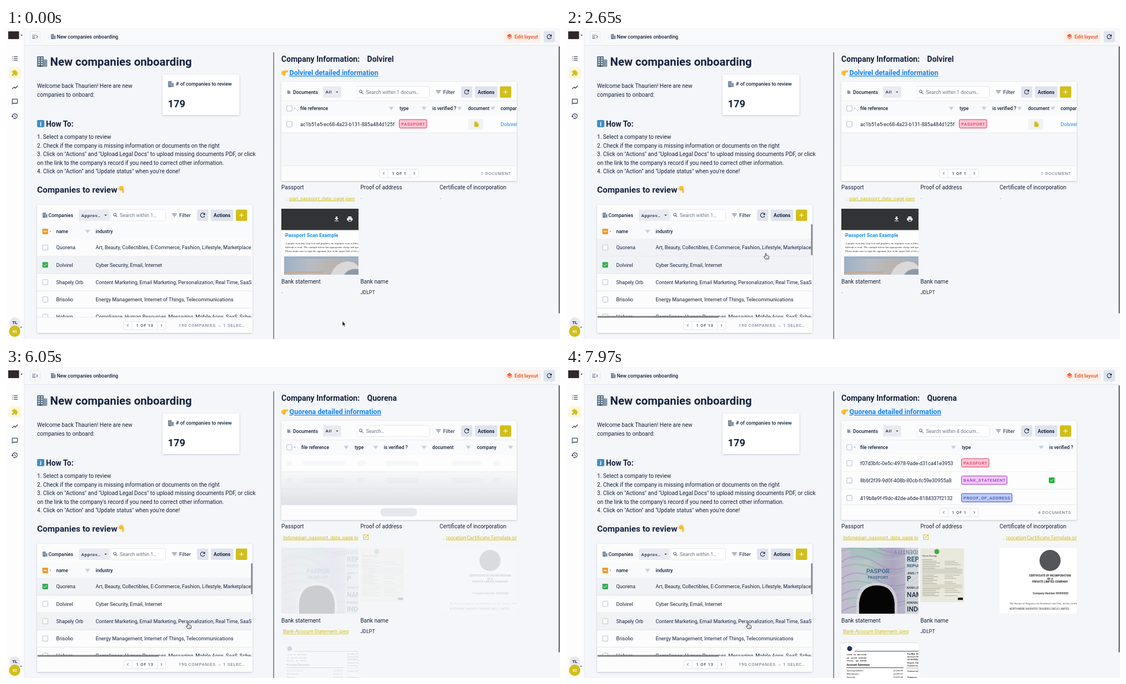
These frames come from a looping animation (998x561 px, 7990 ms). An HTML page:

```html
<!DOCTYPE html>
<html lang="en">
<head>
<meta charset="utf-8">
<title>Onboarding workspace</title>
<style>
html,body{margin:0;width:100%;height:100%;overflow:hidden;background:#f5f6f9}
svg{display:block;width:100vw;height:100vh}
text{font-family:Roboto,sans-serif;white-space:pre}
.serif{font-family:"Liberation Serif",serif}
.mono{font-family:"Liberation Mono",monospace}
.card{filter:drop-shadow(0 1px 1.5px rgba(50,60,110,.28))}
</style>
</head>
<body>
<svg id="stage" viewBox="0 0 998 561" preserveAspectRatio="none"></svg>
<script>
const LOOP = 7990, NAVY = '#14233f', GOLD = '#d0be1b', LINE = '#d9dce6';
const FIRST = 'Dolvirel', SECOND = 'Quorena';

const ICON = {
  refresh: 'M17.65 6.35A8 8 0 1 0 19.73 14h-2.08A6 6 0 1 1 12 6c1.66 0 3.14.69 4.22 1.78L13 11h7V4z',
  plus: 'M19 13h-6v6h-2v-6H5v-2h6V5h2v6h6z',
  search: 'M15.5 14h-.8a6.5 6.5 0 1 0-.7.7v.8l5 5 1.5-1.5zm-6 0a4.5 4.5 0 1 1 0-9 4.5 4.5 0 0 1 0 9z',
  filter: 'M10 18h4v-2h-4zM3 6v2h18V6zm3 7h12v-2H6z',
  caret: 'M7 10l5 5 5-5z',
  left: 'M15.4 7.4 14 6l-6 6 6 6 1.4-1.4-4.6-4.6z',
  right: 'M8.6 16.6 10 18l6-6-6-6-1.4 1.4 4.6 4.6z',
  check: 'M9 16.2 4.8 12l-1.4 1.4L9 19 21 7l-1.4-1.4z',
  download: 'M19 9h-4V3H9v6H5l7 7zM5 18v2h14v-2z',
  print: 'M19 8H5a3 3 0 0 0-3 3v6h4v4h12v-4h4v-6a3 3 0 0 0-3-3zm-3 11H8v-5h8zM18 3H6v4h12z',
  puzzle: 'M20.5 11H19V7a2 2 0 0 0-2-2h-4V3.5a2.5 2.5 0 0 0-5 0V5H4a2 2 0 0 0-2 2v3.8h1.5a2.7 2.7 0 0 1 0 5.4H2V20a2 2 0 0 0 2 2h3.8v-1.5a2.7 2.7 0 0 1 5.4 0V22H17a2 2 0 0 0 2-2v-4h1.5a2.5 2.5 0 0 0 0-5z',
  chat: 'M20 2H4a2 2 0 0 0-2 2v18l4-4h14a2 2 0 0 0 2-2V4a2 2 0 0 0-2-2zm0 14H6l-2 2V4h16z',
  layers: 'M12 16l9-7-9-7-9 7zm0 2.5-7.4-5.7L3 14l9 7 9-7-1.6-1.3z',
  file: 'M6 2a2 2 0 0 0-2 2v16a2 2 0 0 0 2 2h12a2 2 0 0 0 2-2V8l-6-6zm7 7V3.5L18.5 9z',
  open: 'M19 19H5V5h7V3H3v18h18v-9h-2zM14 3v2h3.6l-9.8 9.8 1.4 1.4L19 6.4V10h2V3z',
  trend: 'M3.5 18.5l6-6 4 4L22 7l-1.4-1.4-7.1 8-4-4L2 17z',
  history: 'M13 3a9 9 0 0 0-9 9H1l4 4 4-4H6a7 7 0 1 1 2 5l-1.4 1.4A9 9 0 1 0 13 3zm-1 5v5l4.3 2.5.7-1.2-3.5-2.1V8z',
  list: 'M3 5h2v2H3zm0 6h2v2H3zm0 6h2v2H3zM8 5h13v2H8zm0 6h13v2H8zm0 6h13v2H8z',
  menu: 'M3 6h11v2H3zm0 5h9v2H3zm0 5h11v2H3zM16 8.4 17.4 7l5 5-5 5-1.4-1.4 3.6-3.6z'
};

// Text is placed by its left edge and vertical middle.
const text = (x, y, s, size = 9.15, o = {}) =>
  `<text x="${x}" y="${(y + size * .355).toFixed(2)}" font-size="${size}" fill="${o.fill || NAVY}" font-weight="${o.w || 400}"` +
  ` letter-spacing="${o.ls || 0}" text-anchor="${o.anchor || 'start'}" class="${o.cls || ''}"` +
  `${o.u ? ' text-decoration="underline"' : ''}>${s}</text>`;
const rect = (x, y, w, h, fill, r = 0, extra = '') =>
  `<rect x="${x}" y="${y}" width="${w}" height="${h}" rx="${r}" fill="${fill}" ${extra}/>`;
const line = (x1, y1, x2, y2, c = LINE, w = 1, extra = '') =>
  `<path d="M${x1} ${y1}L${x2} ${y2}" stroke="${c}" stroke-width="${w}" ${extra}/>`;
const icon = (name, x, y, size, fill = NAVY) =>
  `<path transform="translate(${x - size / 2} ${y - size / 2}) scale(${size / 24})" d="${ICON[name]}" fill="${fill}" fill-rule="evenodd"/>`;
const circle = (x, y, r, fill) => `<circle cx="${x}" cy="${y}" r="${r}" fill="${fill}"/>`;
const group = (id, body, extra = '') => `<g id="${id}" ${extra}>${body}</g>`;
const clip = (id, body) => `<g clip-path="url(#${id})">${body}</g>`;
const stroke = (c, w = 1) => `stroke="${c}" stroke-width="${w}"`;
const head = (x, y, s) => text(x, y, s, 8.5, { w: 500 });
const funnel = (x, y) => icon('filter', x, y, 10, '#8a92a8');
const caps = (x, y, s, o = {}) => text(x, y, s, 7.5, { ls: .8, fill: '#5a657e', ...o });
const link = (x, s) => text(x, 307.5, s, 8.75, { fill: GOLD, u: 1 });

function building(x, y, s) {
  let out = rect(x, y, s * .62, s, '#5d7285', .4) + rect(x + s * .62, y + s * .3, s * .34, s * .7, '#8496a4');
  for (let r = 0; r < 4; r++)
    for (let c = 0; c < 2; c++)
      out += rect(x + s * (.1 + c * .27), y + s * (.1 + r * .21), s * .15, s * .12, '#cfe0ea');
  return out + rect(x + s * .24, y + s * .86, s * .14, s * .14, '#33414d');
}

function pointer(x, y, turn) {
  const finger = (fx, fy, w) => rect(fx, fy, w, 2.9, '#fcc435', 1.4, stroke('#e5a020', .4));
  return `<g transform="translate(${x} ${y}) rotate(${turn})">` +
    rect(-6, -2.6, 6.5, 7.4, '#fcc435', 2.4) + finger(-2, -3.2, 8.5) + finger(-2, -.6, 4) +
    finger(-2, 1.6, 3.6) + finger(-2.4, 3.2, 3.2) + '</g>';
}

const box = (x, y, c = '#b8bfda') => rect(x - 4.7, y - 4.7, 9.4, 9.4, '#fff', 1.2, stroke(c, 1.1));
const ticked = (x, y, c = '#35ad56') => rect(x - 5.1, y - 5.1, 10.2, 10.2, c, 1.4) + icon('check', x, y, 8.6, '#fff');

const refreshButton = (x, y) => rect(x, y, 20.5, 20.5, '#dfe3ec', 2) + icon('refresh', x + 10.2, y + 10.2, 13);

function toolbar(y, p) {
  const top = y - 10.3;
  return text(p.title, y, p.name, 8.8, { w: 500 }) +
    rect(p.pick, top, p.pickW, 20.5, '#e9ebf1', 2) +
    text(p.pick + 4.5, y, p.choice, 8.1, { w: 500, ls: .7 }) + icon('caret', p.pick + p.pickW - 7.5, y, 10) +
    rect(p.find, top, p.findW, 20.5, '#fff', 2, stroke('#e4e6ee', .9)) +
    icon('search', p.find + 8, y, 11, '#4b5670') +
    icon('filter', p.filter, y, 12, '#4b5670') + text(p.filter + 8.5, y, 'Filter', 9.3) +
    refreshButton(p.tools, top) +
    rect(p.tools + 25, top, 40.5, 20.5, '#dfe3ec', 2) +
    text(p.tools + 45.2, y, 'Actions', 8.8, { w: 700, anchor: 'middle' }) +
    rect(p.tools + 70, top, 20.5, 20.5, GOLD, 2) + icon('plus', p.tools + 80.2, y, 13, '#fff');
}

const pager = (x, y, w, s) =>
  rect(x, y - 7.5, w, 15, '#fff', 1.5, stroke('#dfe2ea', .9)) +
  line(x + 15, y - 7.5, x + 15, y + 7.5, '#dfe2ea', .9) + line(x + w - 15, y - 7.5, x + w - 15, y + 7.5, '#dfe2ea', .9) +
  icon('left', x + 7.5, y, 10, '#5a657e') + icon('right', x + w - 7.5, y, 10, '#5a657e') +
  caps(x + w / 2 + .4, y, s, { anchor: 'middle', w: 500, fill: '#3d4963' });

function badge(x, y, w, s, fill, ink) {
  return rect(x, y - 7.8, w, 15.2, fill, 2, stroke(ink, 1)) + text(x + 3.6, y, s, 7.55, { ls: .72, fill: ink, w: 500 });
}

function chrome() {
  return rect(0, 0, 998, 561, '#f5f6f9') + rect(33, 0, 965, 31, '#f8f9fb') + rect(0, 0, 33, 561, '#fdfdfe') +
    line(33, 31.5, 998, 31.5, '#e3e5ec') + line(33, 0, 33, 561, '#e6e8ee', .8) +
    rect(4, 6, 19.5, 14, '#2e2a2b') + icon('caret', 28, 13, 9) +
    rect(43, 6.5, 18.5, 18.5, '#f8f9fb', 2, stroke('#e3e5ec', .8)) + icon('menu', 52, 15.7, 13, '#5b6680') +
    building(81, 11, 9) + text(91.5, 15.8, 'New companies onboarding', 8.85, { w: 500 }) +
    rect(897, 5.5, 66, 20.5, '#fcf0ec', 2) + icon('layers', 907, 15.5, 12.5, '#ef6237') +
    text(916, 15.8, 'Edit layout', 9, { w: 700, fill: '#ef6237' }) + refreshButton(968.5, 5.5) +
    icon('list', 16, 55, 13) + rect(5, 70.5, 23, 21, '#faf7df', 2) + icon('puzzle', 16, 81, 12.5, GOLD) +
    icon('trend', 16, 107, 13) + icon('chat', 16, 133, 12.5) + icon('history', 15.5, 159, 13) +
    circle(16, 532, 10, '#e6e8ed') + text(16, 531.5, 'TL', 8, { w: 700, anchor: 'middle' }) +
    circle(15.7, 547, 10.2, GOLD) + text(15.7, 547.3, 'Kt', 8, { w: 500, anchor: 'middle', fill: '#fff' }) +
    icon('caret', 27, 540, 8) +
    line(482.2, 44, 482.2, 561, '#4d566c', 1.3) + rect(995.3, 33, 2.6, 482, '#77787c', 1.3);
}

function intro() {
  const steps = ['1. Select a company to review',
    '2. Check if the company is missing information or documents on the right',
    '3. Click on "Actions" and "Upload Legal Docs" to upload missing documents PDF, or click',
    "on the link to the company's record if you need to correct other information.",
    '4. Click on "Action" and "Update status" when you\'re done!'];
  return building(56, 51, 19) + text(79.5, 60.5, 'New companies onboarding', 20.4, { w: 700 }) +
    text(56, 104.5, 'Welcome back Thaurien! Here are new', 10.1) + text(56, 120, 'companies to onboard:', 10.1) +
    rect(282, 84, 138.5, 73, '#fff', 1.5, 'class="card"') +
    building(292, 96, 10.5) + text(306, 101.3, '# of companies to review', 8.95, { w: 500 }) +
    text(291.5, 136, '179', 18.3, { w: 700 }) +
    rect(56, 166, 13, 13, '#3d8fc4', 2) + text(62.5, 172.7, 'i', 11, { w: 700, fill: '#fff', anchor: 'middle' }) +
    text(72, 173, 'How To:', 13.8, { w: 700 }) +
    steps.map((s, i) => text(56, 196.3 + i * 15.65, s, 10.1)).join('') +
    text(56, 291.7, 'Companies to review', 15.4, { w: 700 }) + pointer(209, 291, 90);
}

const ROW0 = 396, PITCH = 31.25;
const companies = [
  [SECOND, 'Art, Beauty, Collectibles, E-Commerce, Fashion, Lifestyle, Marketplace,'],
  [FIRST, 'Cyber Security, Email, Internet'],
  ['Shapely Orb', 'Content Marketing, Email Marketing, Personalization, Real Time, SaaS'],
  ['Brisolio', 'Energy Management, Internet of Things, Telecommunications'],
  ['Hobarn', 'Compliance, Human Resources, Messaging, Mobile Apps, SaaS, Scheduling']];

function companyTable() {
  const rows = companies.map(([name, field], i) => {
    const y = ROW0 + i * PITCH;
    return rect(56, y - 15.6, 388, PITCH, '#f1f2f6', 0, `id="row${i}"`) +
      line(56, y + 15.7, 442, y + 15.7, '#cfd3dd', .8, 'stroke-dasharray="2 .8"') +
      `<g id="off${i}">${box(70.7, y)}</g><g id="on${i}">${ticked(70.7, y)}</g>` +
      text(90.5, y + .2, name) + text(161.5, y + .2, field);
  }).join('');
  return rect(56, 319, 388, 231, '#fcfcfd', 2, 'class="card"') + building(66, 333, 9) +
    toolbar(337.7, { title: 76.5, name: 'Companies', pick: 131, pickW: 56, choice: 'Approv…', find: 189, findW: 98.5, filter: 303.5, tools: 344 }) +
    text(205, 337.7, 'Search within 1…', 8.9, { fill: '#69738a' }) +
    rect(56, 354, 388, 26.5, '#f9fafc') +
    rect(65.6, 361.9, 10.2, 10.2, '#f39a1f', 1.4) + rect(67.8, 366.2, 5.8, 1.5, '#fff') + icon('caret', 80, 367, 7, '#6d778e') +
    head(90.5, 367, 'name') + funnel(147, 367) + head(161.5, 367, 'industry') +
    clip('rows', rows) + rect(56, 522, 388, 28, '#fcfcfd') + line(56, 522, 444, 522, '#e6e8ef') +
    pager(212, 536.5, 75.5, '1 OF 13') + caps(311, 536.5, '190 COMPANIES → 1 SELEC…') +
    group('bars', rect(441.5, 354, 2.6, 56, '#808285', 1.3) + rect(56.5, 519.6, 219.5, 2.8, '#808285', 1.4));
}

const titleFor = name => text(650.5, 56, name, 14.05, { w: 700 }) +
  text(510.5, 80.7, name + ' detailed information', 12.55, { w: 700, fill: '#1583ee', u: 1 });
const find = s => text(648.5, 115.5, s, 8.9, { fill: '#69738a' });
const docHeads = list => list.map(([x, s, f]) => head(x, 145, s) + (f ? funnel(f, 145) : '')).join('');
const rowLine = y => line(496, y, 920, y, '#dfe1e9', .8);
const docRow = (y, id) => rect(496, y - 15.5, 424, 31, '#fdfdfe') + rowLine(y + 15.6) + box(510.5, y) + text(530, y, id, 9.1);

function skeleton() {
  const bars = [[506, 10], [535, 76], [632, 16], [682, 61], [802, 55], [877, 14]];
  return find('Search…') +
    docHeads([[532, 'file reference', 613], [628, 'type', 666], [680.5, 'is verified ?', 753], [768, 'document', 833], [848.5, 'company', 909]]) +
    rect(496, 158, 424, 31, '#fdfdfe') + rect(496, 189, 424, 60, 'url(#dim)') + rowLine(189) + rowLine(220) +
    group('pulse', [173.5, 204.5].map(y => bars.map(([x, w]) => rect(x, y - 5, w, 10, '#dddfe5', 5)).join('')).join('')) +
    rect(496, 249, 424, 27, '#fcfcfd') + rect(675, 254.5, 65, 15, '#e5e7ec', 6);
}

function documents() {
  const single = find('Search within 1 docum…') +
    docHeads([[530, 'file reference', 694], [709, 'type', 753], [768, 'is verified ?', 817], [832.5, 'document', 877], [891, 'company']]) +
    docRow(173.5, 'ac1b51e5-ec68-4a23-b131-885a484d125f') + badge(708.5, 173, 49.5, 'PASSPORT', '#ffc6d4', '#d63a66') +
    rect(832.5, 164, 27.5, 19.5, '#f1f2f5', 2) + icon('file', 847.5, 173.7, 11.5, GOLD) +
    text(891, 173.7, FIRST, 9.1, { fill: '#1583ee' }) + caps(910, 262.3, '1 DOCUMENT', { anchor: 'end' });
  const several = find('Search within 4 docum…') +
    docHeads([[530, 'file reference', 698], [713, 'type', 856], [870.5, 'is verified ?']]) +
    docRow(173.5, 'f07d3bfc-0e5c-4978-9ade-d31ca41e3953') + docRow(204.7, '8b6f2f39-9d0f-408b-80cb-fc59e30955a8') +
    clip('docs', docRow(236.3, '419b8e9f-f9dc-42de-a6de-8184337f2132')) +
    badge(712.5, 173, 49.5, 'PASSPORT', '#ffc6d4', '#d63a66') +
    badge(712.5, 204.4, 82, 'BANK_STATEMENT', '#f0c9fc', '#a234c4') +
    badge(712.5, 236, 91, 'PROOF_OF_ADDRESS', '#bccbfb', '#3a50b8') +
    ticked(875, 204.3, '#16b52b') + line(496, 248.5, 920, 248.5, '#e6e8ef') + caps(910, 262.3, '4 DOCUMENTS', { anchor: 'end' });
  return rect(496, 97, 424, 179, '#fcfcfd', 2, 'class="card"') + rect(496, 158, 424, 90.5, '#f6f7fa') +
    icon('file', 509.5, 115.3, 8.5, '#8b949f') + rect(507, 112, 4, 1, '#dfe5ea') +
    toolbar(115.5, { title: 517, name: 'Documents', pick: 571, pickW: 33, choice: 'All', find: 632, findW: 131, filter: 779, tools: 819.7 }) +
    rect(496, 131, 424, 27, '#f9fafc') + line(496, 131.5, 920, 131.5, '#e6e8ef', .8) + rowLine(158.4) +
    box(510.5, 145) + icon('caret', 520, 145, 7, '#6d778e') +
    line(496, 248.5, 920, 248.5, '#e6e8ef') + pager(673, 262.3, 70, '1 OF 1') +
    clip('table', group('single', single) + group('skeleton', skeleton()) + group('several', several));
}

function scanPreview() {
  const note = ['A proper scan has clear text and graphics, an improper scan is blurry and',
    'difficult to read. The example below has appropriate clarity and quality.',
    'Please make sure to sign the signature line of the upper half of the page'];
  return clip('shotA', rect(496, 326, 139, 119, '#fff') + rect(496, 326, 139, 38.5, '#323336') +
    icon('download', 595.5, 344.5, 12, '#fff') + icon('print', 619.3, 344.5, 12, '#fff') +
    text(503, 374, 'Passport Scan Example', 9, { w: 700, fill: '#1590ee' }) +
    note.map((s, i) => text(503, 388.3 + i * 6.8, s, 4.9, { cls: 'serif', fill: '#222' })).join('') +
    rect(501, 412, 134, 33, 'url(#photo)') + rect(501, 412, 134, 4, '#9db0c5') +
    '<path d="M585 445q8-22 30-24 14 0 20 10v14z" fill="#d9dad8"/><path d="M609 445q8-13 26-10v10z" fill="#8c98ab"/>' +
    rect(502, 439, 70, 3, '#c4aa98'));
}

function idPage() {
  let waves = '';
  for (let i = 0; i < 15; i++) {
    const y = 322 + i * 10;
    waves += `<path d="M496 ${y}q28 ${i % 3 * 9 - 22} 66 3t78 -12" fill="none" stroke="${['#9b86bb', '#83a99c', '#c4b8d4'][i % 3]}" stroke-width="2" opacity=".5"/>`;
  }
  const side = (y, s, size, w) => text(614, y, s, size, { w, fill: w > 600 ? '#2f6480' : '#22303c' });
  return clip('shotA', rect(496, 326, 139, 119, 'url(#idTint)') + rect(512, 326, 56, 22, '#9fc0ba', 0, 'opacity=".6"') + waves +
    rect(611, 326, 24, 119, '#dcdfe0', 0, 'opacity=".75"') +
    `<g transform="rotate(180 604 334)">${text(574, 334, 'IDENTITY', 10, { w: 700, fill: '#8290a4' })}</g>` +
    side(346.5, 'REPUB', 12, 700) + side(358, 'REPUB', 8, 700) + side(372, 'JENIS / T', 5, 500) + side(382, 'P', 12, 500) +
    side(398, 'NAMA LE', 5, 500) + side(411, 'NAMA', 12, 500) + side(425, 'KEWARG', 5, 500) + side(437, 'INDO', 12, 500) +
    text(562, 368, 'PASPOR', 11, { w: 700, fill: '#4a6f96', anchor: 'middle' }) +
    text(562, 379, 'PASSPORT', 7.4, { w: 700, fill: '#4a6f96', anchor: 'middle' }) +
    '<path d="M523 445v-22q4-34 37-34t37 34v22z" fill="#d7d8dc" opacity=".75"/>' +
    '<path d="M528 445v-19q3-32 32-32t32 32v19z" fill="#050505"/>');
}

function bill() {
  let out = rect(638.5, 327, 78.5, 97, '#e9e8dc') + circle(668, 333, 4.5, '#4ca648') +
    text(642, 340, 'Home Energy', 4.3, { w: 700, fill: '#666' });
  for (let i = 0; i < 22; i++) {
    const y = 347 + i * 3.1;
    out += rect(642, y, 18 + i * 7 % 15, .8, '#8f8f88') + (i % 4 ? rect(682, y, 14 + i * 5 % 16, .8, '#a2a299') : '');
  }
  return out + rect(642, 364, 72, 9, '#d3d3c8') + rect(642, 392, 72, 7, '#d9d7c6') + rect(706, 416, 9, 4.2, '#111');
}

function certificate() {
  const mid = (y, s, size = 4.9) => text(872, y, s, size, { w: 700, fill: '#222', anchor: 'middle' });
  return clip('shotB', rect(781, 326, 139, 119, '#fff') + circle(872, 349, 19, '#55565a') +
    mid(376.5, 'CERTIFICATE OF INCORPORATION', 4.8) + mid(382, 'OF A') + mid(387.5, 'PRIVATE LIMITED COMPANY') +
    text(873, 408.7, 'Company Number 00000000', 5, { w: 500, fill: '#222', anchor: 'middle' }) +
    text(799, 426, 'The Keeper of Registers for Northmere and Vale, hereby certifies', 4.8, { cls: 'serif', fill: '#333' }) +
    text(799, 436, 'NORTHMERE INVENTED TRADERS CIRCLE LIMITED', 4.7, { fill: '#333' }));
}

function statement() {
  const mono = (y, s) => text(505.5, y, s, 4, { cls: 'mono', w: 700, fill: '#222' });
  const small = (x, y, s, w = 400) => text(x, y, s, 4, { w, fill: '#222' });
  return clip('shotC', rect(496, 497, 139, 64, '#fff') + line(496, 497.3, 635, 497.3, '#d8dae0') +
    circle(511, 508, 4.5, '#26305f') + line(520, 512.7, 635, 512.7, '#26305f', .9) +
    mono(518.7, 'Lena Jo Harvick') + mono(524.3, '40 Larch Avenue') + mono(529.8, 'Vesto, QX 00000') +
    text(505.5, 537.5, 'Account Summary', 5, { w: 700, fill: '#222' }) + line(505, 542.5, 608, 542.5, '#333', .9) +
    [['Opening Balance', '$5,234.09'], ['Withdrawals', '$2,395.67'], ['Deposits', '$2,872.45']].map(([a, b], i) =>
      small(505.5, 547.5 + i * 6, a) + text(607, 547.5 + i * 6, b, 4, { anchor: 'end', fill: '#222' })).join('') +
    ['For Mar 10, 2', 'Account Num', '00-000000', 'Branch Trans', 'Contact us b', '', 'Contact info', '', 'Summary'].map((s, i) =>
      small(615, 517.5 + i * 5.2, s, i < 1 ? 700 : 500)).join('') + rect(613, 541, 22, 4, '#d4d6dd', 0, 'opacity=".6"'));
}

function files() {
  const label = (x, y, s) => text(x, y, s, 10.1);
  const dash = (x, y) => text(x, y, '-', 9, { fill: '#8c94a5' });
  const before = clip('linkA', text(503.5, 307.5, '…', 8.75, { fill: GOLD }) + link(510, 'sian_passport_data_page.jpeg')) +
    dash(638.5, 307) + dash(781.5, 307) + dash(496.5, 477) + scanPreview();
  const after = clip('linkA', link(499, 'Indonesian_passport_data_page.jpeg')) + icon('open', 648.3, 307, 12.5, GOLD) +
    clip('linkB', text(785.5, 307.5, '…', 8.75, { fill: GOLD }) + link(793, 'rporation-Certificate-Template.png')) +
    text(499, 477.2, 'Bank-Account-Statement-.jpeg', 8.75, { fill: GOLD, u: 1 });
  return label(496, 287.5, 'Passport') + label(638.5, 287.5, 'Proof of address') + label(781, 287.5, 'Certificate of incorporation') +
    label(496, 457.3, 'Bank statement') + label(638.5, 457.3, 'Bank name') + text(638.5, 477, 'JDLPT', 8.8) +
    group('before', before) + group('after', after) +
    group('images', idPage() + bill() + certificate() + statement());
}

const area = (id, x, y, w, h) => `<clipPath id="${id}"><rect x="${x}" y="${y}" width="${w}" height="${h}"/></clipPath>`;
const blend = (id, dir, ...stops) => `<linearGradient id="${id}" ${dir}>` +
  stops.map((c, i) => `<stop offset="${i / (stops.length - 1)}" stop-color="${c}"/>`).join('') + '</linearGradient>';

const stage = document.getElementById('stage');
stage.innerHTML = '<defs>' + area('rows', 56, 380, 386, 142) + area('docs', 496, 220, 424, 28.5) + area('table', 496, 97, 424, 179) +
  area('shotA', 496, 326, 139, 119) + area('shotB', 781, 326, 139, 119) + area('shotC', 496, 496, 139, 65) +
  area('linkA', 496, 298, 139, 18) + area('linkB', 781, 298, 139, 18) +
  blend('dim', 'x2="0" y2="1"', '#f7f8fa', '#dfe1e6') + blend('photo', '', '#9fb0c6', '#b8bcc4', '#bcb3ad', '#a6b1c0') +
  blend('idTint', '', '#c2b9cf', '#b5c7c6', '#aca3c0', '#c9cbd2') + '</defs>' +
  chrome() + intro() + companyTable() +
  text(496, 56, 'Company Information:', 14.05, { w: 700 }) + pointer(502, 80, 0) +
  group('titleA', titleFor(FIRST)) + group('titleB', titleFor(SECOND)) + documents() + files() +
  group('arrow', '<path d="M0 -4.5V4.6L2.1 2.7 3.6 6 5 5.4 3.6 2.2H6.2z" fill="#111" stroke="#fff" stroke-width=".7"/>') +
  group('hand', '<path d="M-2 -4.6c0-1.3 1.8-1.3 1.8 0v3l3.7.8c.9.2 1.3.8 1.2 1.7L4 4.8H-1.6L-4.4 1.2c-.4-.9.7-1.5 1.4-.9l1 .9z" fill="#fff" stroke="#222" stroke-width=".9" stroke-linejoin="round"/>' +
    line(.6, 1.4, .6, 3.4, '#222', .6) + line(2.2, 1.4, 2.2, 3.4, '#222', .6));

const part = {};
stage.querySelectorAll('g[id],rect[id]').forEach(n => part[n.id] = n);
const show = (id, on) => part[id].setAttribute('display', on ? 'inline' : 'none');
const fade = (id, v) => part[id].setAttribute('opacity', v.toFixed(3));
const clamp = v => Math.min(1, Math.max(0, v));
const ease = v => v * v * (3 - 2 * v);

// time, x, y
const path = [[100, 606, 533], [700, 385, 428], [1200, 361, 412], [3350, 361, 412], [3700, 340, 437], [4250, 340, 437], [4650, 329, 467]];
const SELECT = 2700, OPEN = 5500, IMAGES = 5950, LOADED = 7200;

function cursorAt(t) {
  const i = path.findIndex(p => p[0] > t);
  if (i === 0) return path[0].slice(1);
  if (i < 0) return path[path.length - 1].slice(1);
  const [a, b] = [path[i - 1], path[i]], k = ease((t - a[0]) / (b[0] - a[0]));
  return [a[1] + (b[1] - a[1]) * k, a[2] + (b[2] - a[2]) * k];
}

function update(t) {
  const [x, y] = cursorAt(t);
  const inside = x > 56 && x < 444 && y > 319 && y < 550;
  const hover = inside ? Math.floor((y - 5 - ROW0) / PITCH + .5) : -1;
  const chosen = t < SELECT ? 1 : 0;
  companies.forEach((_, i) => {
    show('row' + i, i === hover || i === chosen);
    show('on' + i, i === chosen);
    show('off' + i, i !== chosen);
    part['off' + i].firstChild.setAttribute('stroke', i === hover ? '#bfc1c6' : '#b8bfda');
  });
  show('bars', inside);
  show('hand', hover >= 0);
  show('arrow', hover < 0);
  for (const id of ['hand', 'arrow']) part[id].setAttribute('transform', `translate(${x.toFixed(2)} ${y.toFixed(2)})`);

  const open = t >= OPEN;
  for (const id of ['titleA', 'single', 'before']) show(id, !open);
  for (const id of ['titleB', 'after']) show(id, open);
  show('skeleton', open && t < LOADED);
  show('several', t >= LOADED);
  fade('pulse', .2 + .35 * (1 - Math.cos((t - 6050) / 1700 * Math.PI * 2)));
  fade('images', clamp((t - IMAGES) / 600));
}

const start = performance.now();
function tick() {
  update((performance.now() - start) % LOOP);
  requestAnimationFrame(tick);
}
tick();
</script>
</body>
</html>
```
